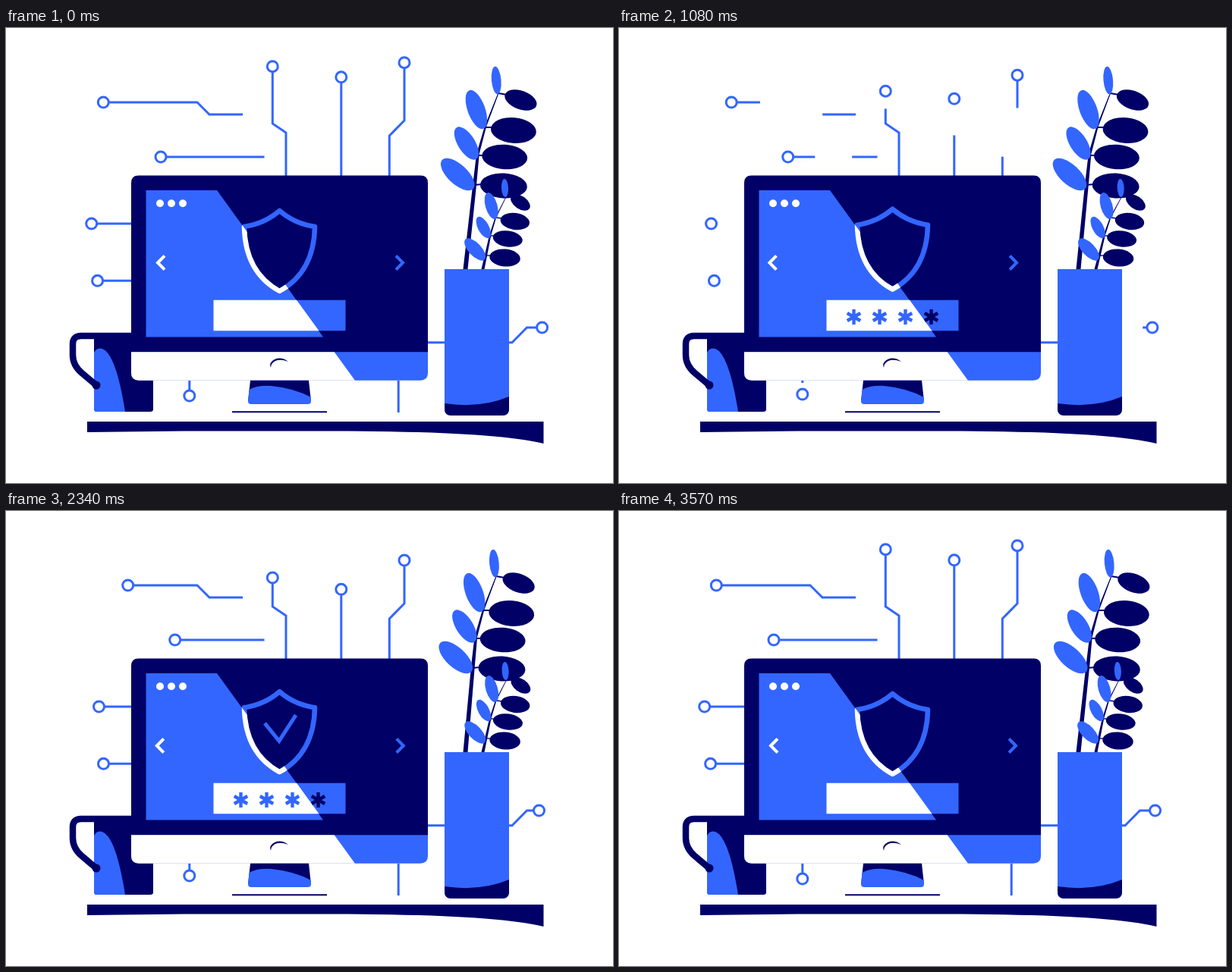
Recreate the animation shown at these times as an HTML page. Size 800x600 px, loop 3.6 s.

```html
<!DOCTYPE html>
<html lang="en">
<head>
<meta charset="utf-8">
<title>Secure login</title>
<style>
  html, body { margin: 0; width: 100%; height: 100%; overflow: hidden; background: #fff; }
  svg { display: block; width: 800px; height: 600px; }
  .navy { fill: #006; }
  .blue { fill: #36f; }
  .white { fill: #fff; }
  .line { fill: none; stroke: #36f; stroke-width: 3; }
  .arrow { fill: none; stroke-width: 4; }
  .star { fill: none; stroke-width: 4.4; }
</style>
</head>
<body>
<svg viewBox="0 0 800 600">
  <defs>
    <clipPath id="left"><path d="M0 150H231.6L485.5 500H0Z"/></clipPath>
    <clipPath id="right"><path d="M231.6 150H800V500H485.5Z"/></clipPath>
    <path id="shield" d="M360.5 241Q380 258 407 262Q406 322 360.5 347Q315 322 314 262Q341 258 360.5 241Z" stroke-width="6.5" stroke-linejoin="round"/>
    <g id="stars"></g>
  </defs>

  <g id="wires"></g>

  <g id="mug">
    <path class="navy" d="M116 403H194V503Q194 506 190 506H120Q116 506 116 502Z"/>
    <path class="blue" d="M116 428Q120 421 127 423Q145 430 157 506H119Q116 506 116 502Z"/>
    <path d="M170 406H99Q88 406 88 417V431Q88 445 100 455L119 471" fill="none" stroke="#006" stroke-width="8.5"/>
    <circle class="navy" cx="119" cy="471" r="5.5"/>
  </g>

  <g id="monitor">
    <path class="navy" d="M165 428V204Q165 194.5 174.5 194.5H546.5Q556 194.5 556 204V428Z"/>
    <path id="chin" class="blue" d="M165 427.3H556V455Q556 464.7 546 464.7H175Q165 464.7 165 455Z"/>
    <path class="white" clip-path="url(#left)" d="M165 427.3H556V464.7H175Q165 464.7 165 455Z"/>
    <path class="blue" d="M184.5 214H278L418 407.5H184.5Z"/>
    <circle class="white" cx="203" cy="231.3" r="5"/>
    <circle class="white" cx="218" cy="231.3" r="5"/>
    <circle class="white" cx="233" cy="231.3" r="5"/>
    <path class="blue" d="M273.5 358.7H447.5V399.3H273.5Z"/>
    <path class="white" clip-path="url(#left)" d="M273.5 358.7H447.5V399.3H273.5Z"/>
    <use href="#stars" clip-path="url(#left)" stroke="#36f"/>
    <use href="#stars" clip-path="url(#right)" stroke="#006"/>
    <use class="bob navy" href="#shield" stroke="#36f"/>
    <g clip-path="url(#left)"><use class="bob" href="#shield" fill="none" stroke="#fff"/></g>
    <g class="bob"><path id="check" d="M341 282.7L360 306L382 272" fill="none" stroke="#36f" stroke-width="5"/></g>
    <path id="prev" class="arrow" stroke="#fff" d="M209 300.3L200 309.5L209 318.7"/>
    <path id="next" class="arrow" stroke="#36f" d="M514 300.3L523 309.5L514 318.7"/>
    <path class="navy" d="M349 448Q346 441 354 437Q363 433 372 440Q362 436 355 439Q349 442 349 448Z"/>
    <path class="navy" d="M322 464.7H399L402 492H319Z"/>
    <path class="blue" d="M320.5 477Q330 471 350 472Q380 475 402 487V492Q402 496 398 496H323Q319 496 319 492Z"/>
    <path class="navy" d="M298 505.2H423V507.2H298Z"/>
  </g>

  <path class="navy" d="M107 519H708.5V548C660 537 580 532 430 531.5H235L107 533Z"/>

  <g id="plants"></g>
  <path class="blue" d="M578 318H663V502Q663 511 654 511H587Q578 511 578 502Z"/>
  <path class="navy" d="M578 495Q625 502 663 486V502Q663 511 654 511H587Q578 511 578 502Z"/>
</svg>
<script>
const LOOP = 3600;
const $ = id => document.getElementById(id);
const clamp = u => Math.min(1, Math.max(0, u));
const ease = u => (1 - Math.cos(Math.PI * clamp(u))) / 2;
const ramp = (t, from, to) => ease((t - from) / (to - from));
const wave = (t, period, peak = 0) => Math.cos(2 * Math.PI * (t - peak) / period);

function add(parent, tag, attrs) {
  const el = document.createElementNS("http://www.w3.org/2000/svg", tag);
  for (const k in attrs) el.setAttribute(k, attrs[k]);
  return parent.appendChild(el);
}

// Wires run from the screen to a node; "@" is the node's moving coordinate.
// node: axis, fixed coordinate, home, pulled-in, overshoot
// move: pull start/end, return start/peak
const wires = [
  { d: "M312 114H268L252 98H@", node: ["x", 98, 128.3, 160.7, 124], move: [720, 1350, 2876, 3300], gap: [418, 1346, 700, 1800] },
  { d: "M340.5 170H@", node: ["x", 170, 204, 222.7, 200.5], move: [360, 1080, 2690, 3120], gap: [225, 1520, 700, 1730] },
  { d: "M369 195V138L351.3 126V@", node: ["y", 351.3, 50.7, 88, 46.5], move: [177, 1357, 2705, 3240], gap: [200, 1007, 658, 1220] },
  { d: "M441.8 195V@", node: ["y", 441.8, 64.8, 103.3, 61], move: [675, 1291, 2960, 3330], gap: [420, 1120, 491, 1581] },
  { d: "M505.3 195V142L525 122V@", node: ["y", 525, 45.7, 65, 41.5], move: [285, 1345, 2863, 3300], gap: [144, 1584, 720, 1980] },
  { d: "M165 258H@", node: ["x", 258, 112.7, 122.5, 110.5], move: [555, 1215, 2670, 3120], gap: [450, 1150, 1080, 1700] },
  { d: "M165 333.3H@", node: ["x", 333.3, 120.6, 128.5, 119.5], move: [720, 1350, 2876, 3300], gap: [676, 1076, 1080, 1700] },
  { d: "M662 414.7H667L686.5 395H@", node: ["x", 395, 706.6, 702.5, 709.5], move: [555, 1215, 2730, 3210], gap: [600, 1232, 1080, 1760] },
  { d: "M241.8 465V@", node: ["y", 241.8, 485, 481, 487.5], move: [720, 1440, 2710, 3180], gap: [450, 930, 850, 1500] },
  { d: "M556 414.7H579", gap: [350, 700, 620, 980] },
  { d: "M517.2 465V507", gap: [412, 867, 1080, 1650] }
];
for (const w of wires) {
  w.path = add($("wires"), "path", { class: "line", d: w.d.replace("@", 0) });
  if (w.node) {
    const other = w.node[0] === "x" ? "cy" : "cx";
    w.ring = add($("wires"), "circle", { class: "line", r: 7, style: "fill:#fff", [other]: w.node[1] });
  }
}

function drawWire(w, t) {
  if (w.node) {
    const [axis, , home, inner, over] = w.node, [a, b, c, p] = w.move;
    const pos = home + (inner - home) * ramp(t, a, b)
      + (over - inner) * ramp(t, c, p) + (home - over) * ramp(t, p, 3560);
    w.ring.setAttribute("c" + axis, pos);
    w.path.setAttribute("d", w.d.replace("@", pos));
  }
  const len = w.path.getTotalLength() - (w.node ? 7 : 0);
  const [a, b, c, e] = w.gap;
  const front = len * ramp(t, a, b), back = Math.min(front, len * ramp(t, c, e));
  w.path.setAttribute("stroke-dasharray", `${back} ${front - back} 999`);
}

// Leaves: x, y, rx, ry, angle; the first four are blue, the rest navy.
const plants = [
  {
    stem: [[605.5, 318], [618, 204], [622, 166], [632, 130], [649, 86]], width: 6,
    leaves: [[646.3, 69, 6.3, 18.3, -5], [620, 107.5, 11.5, 27, -20], [607, 152, 11.3, 24.5, -32], [595.3, 193, 13, 28, -47],
      [678.5, 95, 22, 12.3, 20], [669, 135, 30, 16.8, 5], [657.3, 170, 30, 16.2, 4], [656, 208, 31, 16.5, 3]],
    joints: [[649, 86, 660, 88], [631, 131, 641, 131], [622, 168, 630, 168], [617, 207, 628, 206]],
    shift: t => -1.5 * (1 - wave(t, LOOP, 200)),
    bend: h => 1.2 * h / (h + 35)
  },
  {
    stem: [[628.5, 318], [633, 297], [638, 273], [645, 250], [659, 222]], width: 4,
    leaves: [[657, 211, 4.5, 12, -3], [639.3, 234.5, 7.8, 18, -16], [629, 263, 7.2, 15.5, -28], [618, 292, 8.5, 18.3, -43],
      [677.5, 230, 14.5, 8.5, 35], [670.5, 255, 19.3, 11, 8], [661, 278, 19.6, 10.5, 8], [657.5, 303, 20.3, 11.5, 5]],
    joints: [[659, 223, 668, 223], [645, 250, 654, 251], [638, 274, 645, 274], [632, 300, 640, 300]],
    shift: t => 1.75 + 2.25 * wave(t, LOOP, 1250),
    bend: h => h / 100
  }
];
for (const p of plants) {
  const g = add($("plants"), "g", {});
  p.trunk = add(g, "path", { class: "navy" });
  p.parts = p.joints.map(([x1, y1, x2, y2]) => ({
    y: y1, el: add(g, "path", { d: `M${x1} ${y1}L${x2} ${y2}`, stroke: "#006", "stroke-width": p.width / 3 })
  }));
  const order = [...p.leaves.keys()].sort((a, b) => (b > 3) - (a > 3));
  for (const i of order) {
    const [cx, cy, rx, ry, rot] = p.leaves[i];
    const el = add(g, "g", {});
    add(el, "ellipse", { class: i < 4 ? "blue" : "navy", cx, cy, rx, ry, transform: `rotate(${rot} ${cx} ${cy})` });
    p.parts.push({ y: cy, el });
  }
}

function drawPlant(p, t) {
  const s = p.shift(t), dx = y => s * p.bend(318 - y);
  for (const { y, el } of p.parts) el.setAttribute("transform", `translate(${dx(y)} 0)`);
  const edge = side => p.stem.map(([x, y], i) =>
    `${x + dx(y) + side * p.width * (1 - i * 0.2) / 2} ${y}`);
  p.trunk.setAttribute("d", `M${edge(-1).join("L")}L${edge(1).reverse().join("L")}Z`);
}

const stars = [0, 1, 2, 3].map(() =>
  add($("stars"), "path", { class: "star", d: "M0-10V10M-8.7-5L8.7 5M-8.7 5L8.7-5" }));

function drawStar(el, i, t) {
  const on = 100 + 140 * i, off = 2500 + 100 * i;
  const size = 1.22 * ramp(t, on, on + 200) - 0.22 * ramp(t, on + 200, on + 320) - ramp(t, off, off + 250);
  el.setAttribute("transform", `translate(${309.5 + 34 * i} 381) scale(${size})`);
  el.setAttribute("visibility", size > 0.01 ? "visible" : "hidden");
}

const check = $("check"), checkLen = check.getTotalLength();
const bobs = document.querySelectorAll(".bob");

function draw(t) {
  wires.forEach(w => drawWire(w, t));
  plants.forEach(p => drawPlant(p, t));
  stars.forEach((el, i) => drawStar(el, i, t));

  const lift = -1.75 * (1 - wave(t, LOOP));
  bobs.forEach(el => el.setAttribute("transform", `translate(0 ${lift})`));

  const push = 1 - wave(t, LOOP / 2);
  $("prev").setAttribute("transform", `translate(${-0.9 * push} 0)`);
  $("next").setAttribute("transform", `translate(${0.6 * push} 0)`);

  const tail = checkLen * ramp(t, 2850, 3300), head = checkLen * ramp(t, 1350, 1750);
  check.setAttribute("stroke-dasharray", `0 ${tail} ${head - tail} 999`);
  check.setAttribute("visibility", head - tail > 0.1 ? "visible" : "hidden");
}

function tick() {
  draw(performance.now() % LOOP);
  requestAnimationFrame(tick);
}
tick();
</script>
</body>
</html>
```
